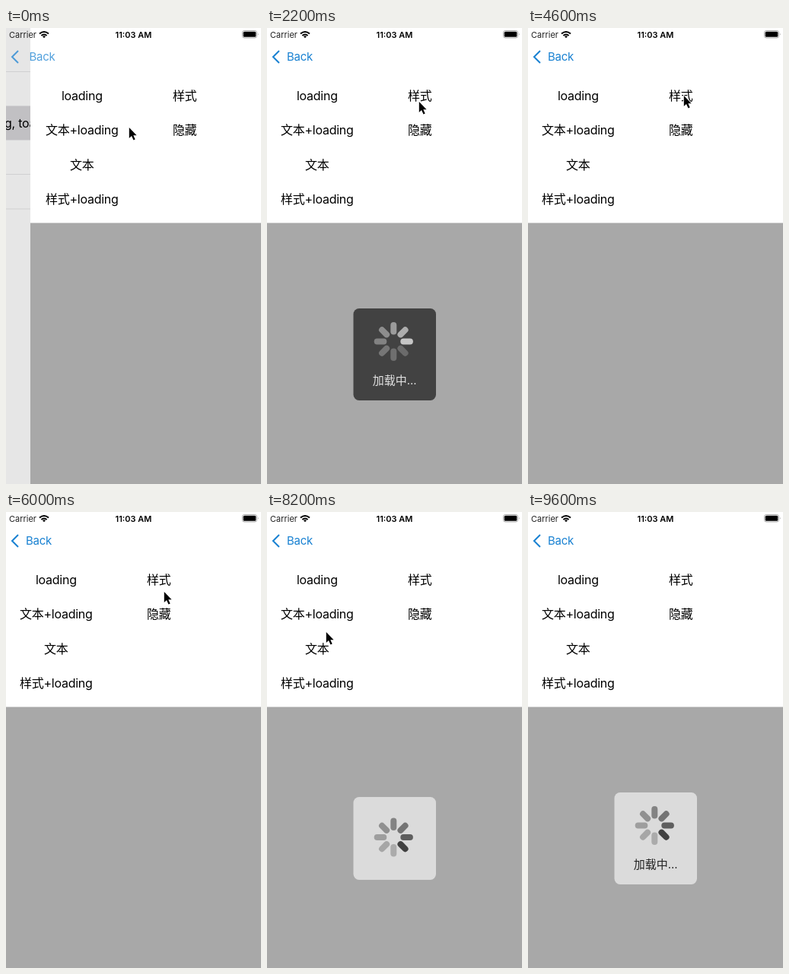
An HTML page that plays this animation: 335 px wide and 600 px high, repeating every 9.7 s.

```html
<!DOCTYPE html>
<html lang="zh">
<head>
<meta charset="utf-8">
<title>HUD demo</title>
<style>
  html, body { margin: 0; width: 100%; height: 100%; overflow: hidden; background: #fff; }
  svg { display: block; width: 335px; height: 600px; }
  text { font-family: Inter, "Noto Sans CJK SC", "Noto Sans CJK", sans-serif; }
  .buttons text { font-size: 16px; letter-spacing: -.25px; text-anchor: middle; }
  .status text { font-size: 11px; }
  .label { font-size: 15px; text-anchor: middle; }
</style>
</head>
<body>
<svg viewBox="0 0 335 600">
  <g id="list">
    <rect width="335" height="600" fill="#e6e6e6"/>
    <rect y="102.5" width="335" height="45" fill="#c1c0c3"/>
    <path d="M0 57.5H335M0 192.5H335M0 238H335" stroke="#d0d0d1"/>
    <text x="-2" y="131" font-size="16" letter-spacing="-.25">g, toast</text>
  </g>
  <g id="page">
    <rect width="337" height="600" fill="#fff"/>
    <rect y="256.5" width="337" height="344" fill="#a8a8a8"/>
  </g>
  <g id="buttons" class="buttons">
    <text x="65.8" y="95">loading</text>
    <text x="65.8" y="140">文本+loading</text>
    <text x="65.8" y="185.5">文本</text>
    <text x="65.8" y="230.5">样式+loading</text>
    <text x="200.8" y="95">样式</text>
    <text x="200.8" y="140">隐藏</text>
  </g>
  <g id="back" fill="#1a82d2">
    <path d="M16 30L8 38L16 46" fill="none" stroke="#1a82d2" stroke-width="2"/>
    <text id="backText" x="26" y="43" font-size="15" letter-spacing="-.3">Back</text>
  </g>
  <g class="status">
    <text x="4" y="13" fill="#222">Carrier</text>
    <text x="167.5" y="13" text-anchor="middle" font-weight="600">11:03 AM</text>
    <g fill="none" stroke="#000" stroke-width="2">
      <path d="M44 7.6Q50 2.4 56 7.6"/>
      <path d="M46.4 10Q50 7 53.6 10"/>
      <path d="M48 11L50 13.2L52 11Q50 9.6 48 11Z" fill="#000" stroke="none"/>
    </g>
    <rect x="310.5" y="3.5" width="19" height="9.5" rx="2.6" fill="none" stroke="#aaa"/>
    <rect x="311.7" y="4.7" width="16.6" height="7.1" rx="1.5"/>
    <path d="M331 6.7Q332.8 8.2 331 9.8Z" fill="#aaa"/>
  </g>
  <g id="hud">
    <rect id="panel" x="113.5" width="108.5" rx="7.5"/>
    <g id="spinner" stroke-width="8" stroke-linecap="round"></g>
    <text id="label" class="label" x="167.7"></text>
  </g>
  <path id="cursor" d="M.8 1V15L4 12L6.5 17.4L8.7 16.4L6.3 11.2H10.6Z" stroke="#fff" stroke-width="1.6" paint-order="stroke"/>
</svg>
<script>
const LOOP = 9700, FRAME = 100, FADE = 200, MID = 429.5;
const $ = id => document.getElementById(id);
const set = (el, attrs) => { for (const k in attrs) el.setAttribute(k, attrs[k]); };
const clamp = v => Math.max(0, Math.min(1, v));

// syncAt: time at which the brightest spoke is number `head`
const huds = [
  { from: 500, to: 1500, height: 109, spin: 428, syncAt: 800, head: 0, fadeIn: true },
  { from: 1500, to: 2900, height: 121, spin: 412.5, syncAt: 2200, head: 2, label: "加载中...", labelY: 468.5, fadeOut: true },
  { from: 4800, to: 5800, height: 71, label: "文本", labelY: 435, fadeIn: true, fadeOut: true },
  { from: 7500, to: 8700, height: 109, spin: 428, syncAt: 8200, head: 3, light: true, fadeIn: true },
  { from: 8700, to: 9700, height: 121, spin: 412.5, syncAt: 9600, head: 3, label: "加载中...", labelY: 468.5, light: true }
];

// time, x, y of the pointer tip
const path = [
  [0, 161, 130], [600, 77, 92], [1100, 77, 92], [1400, 79, 135], [1700, 79, 135],
  [2200, 199, 96], [2600, 205, 135], [4000, 205, 128], [4600, 204, 88],
  [4900, 78, 176], [5200, 78, 176], [5600, 205, 135], [6000, 207, 104],
  [6300, 207, 88], [6700, 207, 88], [7300, 77, 92], [7800, 77, 92],
  [8200, 77, 157], [8500, 78, 137], [9000, 78, 137], [9500, 255, 110]
];

const tail = [.7, .57, .47, .4, .34, .28, .24, .22];
const spokes = tail.map((_, i) => {
  const spoke = document.createElementNS("http://www.w3.org/2000/svg", "path");
  set(spoke, { d: "M0 -13V-21.6", transform: `rotate(${i * 45})` });
  return $("spinner").appendChild(spoke);
});

function pointer(t) {
  const i = path.findIndex(p => p[0] > t);
  if (i < 0) return path[path.length - 1].slice(1);
  const a = path[i - 1], b = path[i];
  const u = (t - a[0]) / (b[0] - a[0]), e = u * u * (3 - 2 * u);
  return [1, 2].map(k => a[k] + (b[k] - a[k]) * e);
}

function drawHud(t) {
  const hud = huds.find(h => t >= h.from && t < h.to);
  $("hud").style.display = hud ? "" : "none";
  if (!hud) return;
  const fadeIn = hud.fadeIn ? clamp((t - hud.from) / FADE) : 1;
  const fadeOut = hud.fadeOut ? clamp((hud.to - t) / FADE) : 1;
  $("hud").style.opacity = Math.min(fadeIn, fadeOut);
  set($("panel"), { y: MID - hud.height / 2, height: hud.height, fill: hud.light ? "#dbdbdb" : "#424242" });
  $("label").textContent = hud.label || "";
  set($("label"), { y: hud.labelY || 0, fill: hud.light ? "#222" : "#e2e2e2" });
  $("spinner").style.display = hud.spin ? "" : "none";
  if (!hud.spin) return;
  set($("spinner"), { transform: `translate(166.3 ${hud.spin})`, stroke: hud.light ? "#000" : "#fff" });
  const head = Math.round((t - hud.syncAt) / FRAME) + hud.head;
  spokes.forEach((s, i) => s.setAttribute("stroke-opacity", tail[((head - i) % 8 + 8) % 8]));
}

function draw(t) {
  const rest = t < 500 ? Math.exp(-t / 90) : 0;
  set($("page"), { transform: `translate(${32 * rest} 0)` });
  set($("buttons"), { transform: `translate(${34 * rest} 0)` });
  set($("list"), { transform: `translate(${10 * (rest - 1)} 0)` });
  set($("backText"), { x: 26 + 4.5 * rest });
  $("back").style.opacity = 1 - .25 * rest;
  drawHud(t);
  const [x, y] = pointer(t);
  set($("cursor"), { transform: `translate(${x} ${y})` });
  $("cursor").style.display = t > 9500 ? "none" : "";
}

const start = performance.now();
function tick(now) {
  const t = Math.max(0, now - start) % LOOP;
  draw(Math.floor(t / FRAME) * FRAME);
  requestAnimationFrame(tick);
}
draw(0);
requestAnimationFrame(tick);
</script>
</body>
</html>
```
